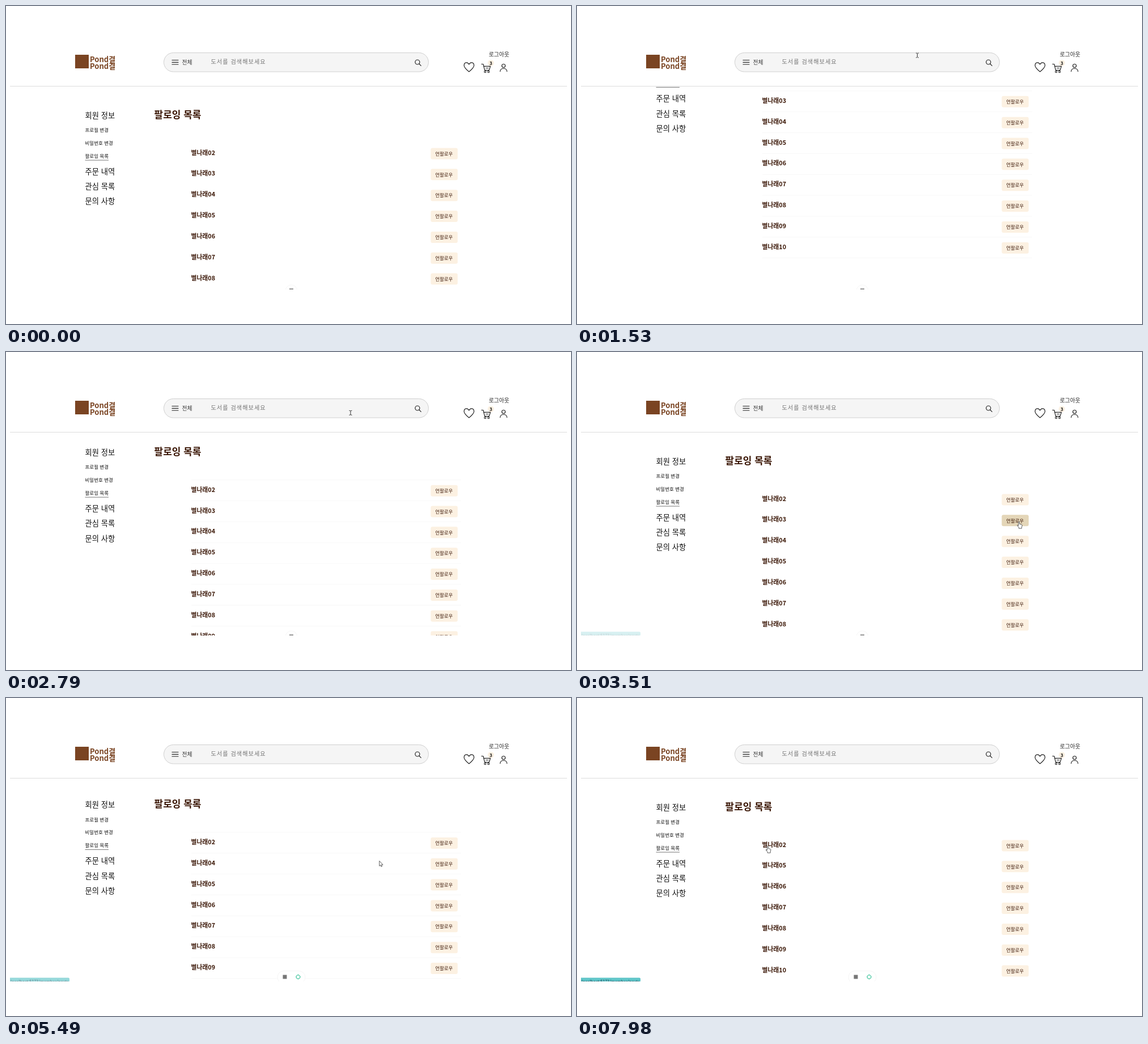
Write an HTML page that moves like this. It is 997 by 561 pixels and loops after 8000 ms.

```html
<!DOCTYPE html>
<html lang="ko">
<head>
<meta charset="utf-8">
<style>
html, body { margin: 0; width: 100%; height: 100%; overflow: hidden; background: #fff; }
svg { display: block; width: 997px; height: 561px; font-family: "Noto Sans CJK KR", "Noto Sans CJK", "Noto Sans", sans-serif; }
.icon { fill: none; stroke: #222; stroke-width: 1.2; stroke-linecap: round; stroke-linejoin: round; }
.cursor { fill: #fff; stroke: #333; stroke-width: .8; stroke-linejoin: round; }
</style>
</head>
<body>
<svg id="stage" viewBox="0 0 997 561"></svg>
<script>
const LOOP = 8000, PITCH = 36.85, MAX_SCROLL = 263;
const BROWN = '#7a4422', DARK = '#3b1706', CREAM = '#fcf1e2';
const BOLD = 'font-weight="700"', MIDDLE = 'text-anchor="middle"';

// Text placed by its left edge and vertical centre
const text = (x, y, size, str, fill = '#111', more = '') =>
  `<text x="${x}" y="${y + size * .38}" font-size="${size}" fill="${fill}" ${more}>${str}</text>`;
const rect = (x, y, w, h, fill, more = '') =>
  `<rect x="${x}" y="${y}" width="${w}" height="${h}" fill="${fill}" ${more}/>`;
const list = (n, make) => Array.from({ length: n }, (_, i) => make(i)).join('');

const brand = (x, y, box, textX, size, gap) =>
  rect(x, y, box, box, BROWN) +
  list(2, i => text(textX, y + box * .34 + i * gap, size, 'Pond결', BROWN, BOLD));

const header = rect(0, 0, 997, 141, '#fff') + rect(7, 141, 983, 1, '#dcdcdc') +
  brand(122, 86, 24, 148, 13, 12) +
  rect(278.5, 82.5, 467, 33.5, '#f5f5f5', 'rx="16.75" stroke="#d0d0d0"') +
  text(310.5, 99, 9.8, '전체', '#333') +
  text(361.5, 98.5, 10.2, '도서를 검색해보세요', '#757575', 'letter-spacing="1"') +
  text(852, 85, 9.8, '로그아웃', '#222') +
  `<circle cx="855.5" cy="100.5" r="5.5" fill="${CREAM}"/>
  <g class="icon">
    <path d="M293 95.5h11M293 99.3h11M293 103h11"/>
    <circle cx="726" cy="99" r="4"/><path d="M729 102l3.3 3.3"/>
    <path d="M817 116C811 111 808.3 108 808.3 105C808.3 99 814.5 98 817 103C819.5 98 825.8 99 825.8 105C825.8 108 823 111 817 116Z"/>
    <path d="M839 102.5h3l2.8 10.8h7.7l2.3-7h-11.7M847 109.5h4"/>
    <circle cx="845.5" cy="116" r="1.5"/><circle cx="851.5" cy="116" r="1.5"/>
    <circle cx="878" cy="105.5" r="3"/><path d="M872 115.5c0-7 12-7 12 0"/>
  </g>` +
  text(855.5, 100.5, 8, '3', '#111', `${BOLD} ${MIDDLE}`);

const menu = (items, y, step, size) =>
  items.map((s, i) => text(139.5, y + i * step, size, s)).join('');
const side = menu(['회원 정보'], 193, 0, 13.3) +
  menu(['프로필 변경', '비밀번호 변경', '팔로잉 목록'], 219, 22.7, 8.5) +
  menu(['주문 내역', '관심 목록', '문의 사항'], 292, 26.2, 13.3) +
  rect(139.5, 271.5, 41.5, 1, '#777');

const rule = y => rect(327, y, 476, 1, '#f8f8f8', 'class="rule"');
const rows = list(9, i => `<g class="row">
    ${rule(241)}${i === 8 ? rule(241 + PITCH) : ''}
    ${text(326.5, 258.5, 10.8, '별나래' + String(i + 2).padStart(2, '0'), DARK, BOLD)}
    ${rect(749.5, 250.5, 47.5, 20, CREAM, 'rx="3" class="button"')}
    ${text(773, 260.5, 8.4, '언팔로우', DARK, MIDDLE)}</g>`);

const footer = rect(7, 655, 983, 108, CREAM) + rect(7, 655, 983, 1, '#e2e2e0') +
  brand(130, 689, 38, 174, 21.3, 20) +
  ['회사소개', '이용약관', '개인정보처리방침']
    .map((s, i) => text(305 + i * 72.5, 690.5, 11, s, DARK)).join('') +
  list(2, i => rect(361 + i * 72.5, 685.5, 1, 10, '#876')) +
  text(305, 720, 11, '대표이사 : 담솔이', DARK) +
  text(401, 720, 11, '주소 : 새온시 다솔구 마루내로 35 406', DARK) +
  text(592, 720, 11, '대표번호 : 0000-0000', DARK) +
  text(707, 720, 10.9, '사업자등록번호 : 000-00-00000', DARK);

document.getElementById('stage').innerHTML = `
  <clipPath id="view"><rect x="7" y="74" width="983" height="426"/></clipPath>
  <clipPath id="bubble"><rect x="7" y="493" width="103" height="7"/></clipPath>
  <g clip-path="url(#view)">
    <g id="page">${side}${text(261.5, 191.5, 17, '팔로잉 목록', DARK, BOLD)}${rows}${footer}</g>
    ${header}
    <g id="status"><path d="M7 493.5h103q2 0 2 2v5h-105z" fill="#5fc5c8"/>
      ${text(8, 500.5, 7.3, 'localhost:5173/member/posts', '#245', 'clip-path="url(#bubble)"')}</g>
    <rect id="pill" height="22" rx="11" fill="#fff" stroke="#eee" stroke-width=".6"/>
    <rect id="mark" width="7" height="7" fill="#777"/>
    <g id="target" fill="none" stroke="#4fc9a4" stroke-width="1.1">
      <circle cx="515.5" cy="492" r="3.3"/>
      <path d="M515.5 487.5v2M515.5 494.5v2M511 492h2M518 492h2"/></g>
    <g id="cursor">
      <path id="ibeam" d="M-2.5-4q2 0 2.5 1q.5-1 2.5-1M0-3v6M-2.5 4q2 0 2.5-1q.5 1 2.5 1" fill="none" stroke="#333"/>
      <path id="arrow" class="cursor" d="M-2.5-5v9l2-1.8l1.3 3l1.5-.7l-1.3-2.8h2.8z"/>
      <path id="hand" class="cursor" d="M-2 1.5v-6.5q1-1.5 2 0v3.5l3.5.9q1 .4 1 1.5l-.8 3.3v2h-5v-1.7l-3-3.5q.2-1.6 2.3.5z"/>
    </g>
  </g>`;

const el = id => document.getElementById(id);
const all = c => [...document.getElementsByClassName(c)];
const rowEls = all('row'), buttons = all('button'), ruleEls = all('rule');
const show = (node, on) => { node.style.display = on ? '' : 'none'; };
const set = (node, attrs) => { for (const k in attrs) node.setAttribute(k, attrs[k]); };

// Smooth 0 to 1 between a and b; trip goes there and back
function ease(t, a, b) {
  const u = Math.min(1, Math.max(0, (t - a) / (b - a)));
  return u * u * (3 - 2 * u);
}
const trip = (t, a, b, c, d) => ease(t, a, b) - ease(t, c, d);

const scrollAt = t => MAX_SCROLL * (trip(t, 1200, 1872, 2455, 2850) +
  trip(t, 4550, 4995, 5150, 5520) + trip(t, 6450, 6700, 6740, 6940));
const statusAt = t => trip(t, 3430, 3680, 3720, 3900) +
  trip(t, 5400, 5550, 5900, 6050) + ease(t, 7500, 7800);

// Pointer moves: start, end, x, y
const MOVES = [
  [700, 1100, 600.5, 87], [1560, 2200, 606, 105], [2750, 3400, 781, 305],
  [3850, 4350, 657, 292], [5420, 6050, 781, 305], [6950, 7740, 337.5, 267]
];
const REMOVED = { 1: 3720, 2: 6300 };

function pointerAt(t) {
  let x = 640, y = 55, moving = false;
  for (const [a, b, toX, toY] of MOVES) {
    const s = ease(t, a, b);
    x += (toX - x) * s;
    y += (toY - y) * s;
    moving ||= t > a && t < b;
  }
  return { x, y, shape: y < 116 ? 'ibeam' : moving ? 'arrow' : 'hand' };
}

function draw(now) {
  const t = now % LOOP, scroll = scrollAt(t), { x, y, shape } = pointerAt(t);
  set(el('page'), { transform: `translate(0 ${-scroll})` });

  let slot = 0;
  rowEls.forEach((row, i) => {
    const live = t < (REMOVED[i] ?? LOOP);
    show(row, live);
    if (!live) return;
    const dy = slot++ * PITCH, top = 250.5 + dy - scroll;
    set(row, { transform: `translate(0 ${dy})` });
    const hover = x > 750 && x < 797 && y > top && y < top + 20;
    set(buttons[i], { fill: hover ? '#e4d6b8' : CREAM });
  });
  ruleEls.forEach(r => show(r, scroll > 0));

  el('status').style.opacity = statusAt(t);
  const open = ease(t, 4150, 4400), half = 10.5 + 14 * open;
  set(el('pill'), { x: 503.5 - half, width: half * 2, y: 492 - 10.5 * open });
  set(el('mark'), { x: 500 - 11.5 * open, y: 498.5 - 10 * open });
  el('target').style.opacity = open;

  set(el('cursor'), { transform: `translate(${x} ${y})` });
  for (const id of ['ibeam', 'arrow', 'hand']) show(el(id), id === shape);
  requestAnimationFrame(draw);
}
draw(0);
</script>
</body>
</html>
```
